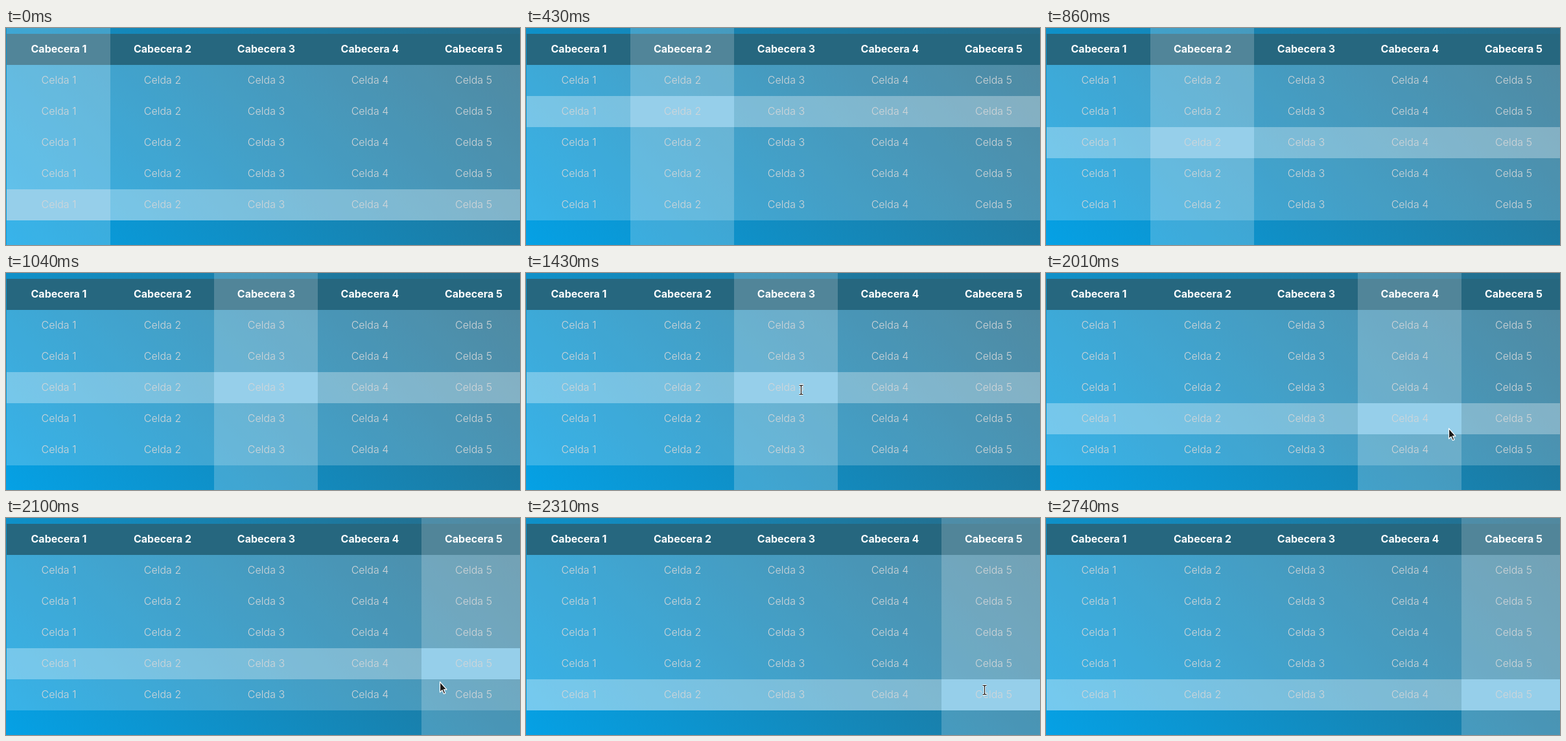
Recreate the animation shown at these times as an HTML page with a canvas. Size 793 by 335 pixels, loop 2.84 s.

```html
<!DOCTYPE html>
<html lang="es">
<head>
<meta charset="utf-8">
<style>
  html, body { margin: 0; width: 100%; height: 100%; overflow: hidden; }
  canvas { display: block; }
</style>
</head>
<body>
<canvas id="stage" width="793" height="335"></canvas>
<script>
const W = 793, H = 335, LOOP = 2840;
const LEFT = 1, TOP = 9, COL = 160, ROW = 48, COUNT = 5;
const BODY = TOP + ROW;
const c = document.getElementById('stage').getContext('2d');

// 45 degree gradient from the bottom left corner to the top right one
const half = (W + H) / 4;
const sky = c.createLinearGradient(W / 2 - half, H / 2 + half, W / 2 + half, H / 2 - half);
sky.addColorStop(0, '#05a1e5');
sky.addColorStop(1, '#266a86');

// Pointer path: [step, x, y]; it advances in whole steps
const START = 1221, STEP = 1000 / 24, LAST = 35;
const path = [[0, 385, 174], [5, 425, 180], [11, 510, 209], [21, 669, 252], [25, 703, 258], [LAST, 748, 332]];

const arrow = new Path2D('M0.5 1V17L4 13.7L6.5 19.5L9 18.4L6.5 12.8H11Z');
const beam = new Path2D('M-3 -7H-1L0 -6L1 -7H3M0 -6V6M-3 7H-1L0 6L1 7H3');

function pointerAt(step) {
  const i = Math.max(1, path.findIndex(p => p[0] >= step));
  const [s0, x0, y0] = path[i - 1], [s1, x1, y1] = path[i];
  const f = (step - s0) / (s1 - s0);
  return { x: Math.round(x0 + (x1 - x0) * f), y: Math.round(y0 + (y1 - y0) * f) };
}

const clampCell = n => Math.min(COUNT - 1, Math.max(0, Math.floor(n)));
const colAt = x => clampCell((x - LEFT) / COL);
const rowAt = y => clampCell((y - BODY) / ROW);

function hoverAt(t, step) {
  if (t < 430) return { col: 0, row: 4 };
  if (t < 860) return { col: 1, row: 1 };
  if (t < 1040) return { col: 1, row: 2 };
  // The highlight trails the pointer by one step
  const p = pointerAt(Math.min(LAST, Math.max(0, step - 1)));
  return { col: colAt(p.x), row: rowAt(p.y) };
}

function box(color, x, y, w, h) {
  c.fillStyle = color;
  c.fillRect(x, y, w, h);
}

function label(text, weight, color, x, y) {
  c.font = weight + ' 16px Inter, "Open Sans", sans-serif';
  c.fillStyle = color;
  c.fillText(text, x, y);
}

function drawPointer({ x, y }) {
  const dx = x - (LEFT + (colAt(x) + 0.5) * COL);
  const dy = y - (BODY + (rowAt(y) + 0.5) * ROW);
  const overText = Math.abs(dx) <= 28 && Math.abs(dy) <= 12;
  c.save();
  c.lineJoin = 'round';
  if (overText) {
    c.translate(x - 0.5, y + 0.5);
    c.strokeStyle = '#fff';
    c.lineWidth = 3;
    c.stroke(beam);
    c.strokeStyle = '#111';
    c.lineWidth = 1.2;
    c.stroke(beam);
  } else {
    c.translate(x, y);
    c.fillStyle = '#1a1a1a';
    c.fill(arrow);
    c.strokeStyle = '#fff';
    c.lineWidth = 1.2;
    c.stroke(arrow);
  }
  c.restore();
}

function draw(t) {
  const step = Math.floor((t - START) / STEP);
  const { col, row } = hoverAt(t, step);
  const x = LEFT + col * COL, y = BODY + row * ROW;

  box(sky, 0, 0, W, H);
  box('#26677f', LEFT, TOP, W, ROW);
  box('rgba(255,255,255,.2)', LEFT, BODY, W, ROW * COUNT);
  box('rgba(255,255,255,.3)', LEFT, y, W, ROW);
  box('rgba(255,255,255,.2)', x, 0, COL, H);
  box('#96cfea', x, y, COL, ROW);

  c.textAlign = 'center';
  for (let i = 0; i < COUNT; i++) {
    const mid = LEFT + (i + 0.5) * COL + 0.5;
    label('Cabecera ' + (i + 1), 700, '#fff', mid, TOP + 29);
    for (let j = 0; j < COUNT; j++) {
      label('Celda ' + (i + 1), 300, '#d3d6d8', mid, BODY + j * ROW + 29);
    }
  }

  if (step >= 0 && step <= LAST) drawPointer(pointerAt(step));
}

const begin = performance.now();
function tick() {
  draw((performance.now() - begin) % LOOP);
  requestAnimationFrame(tick);
}
tick();
</script>
</body>
</html>
```
